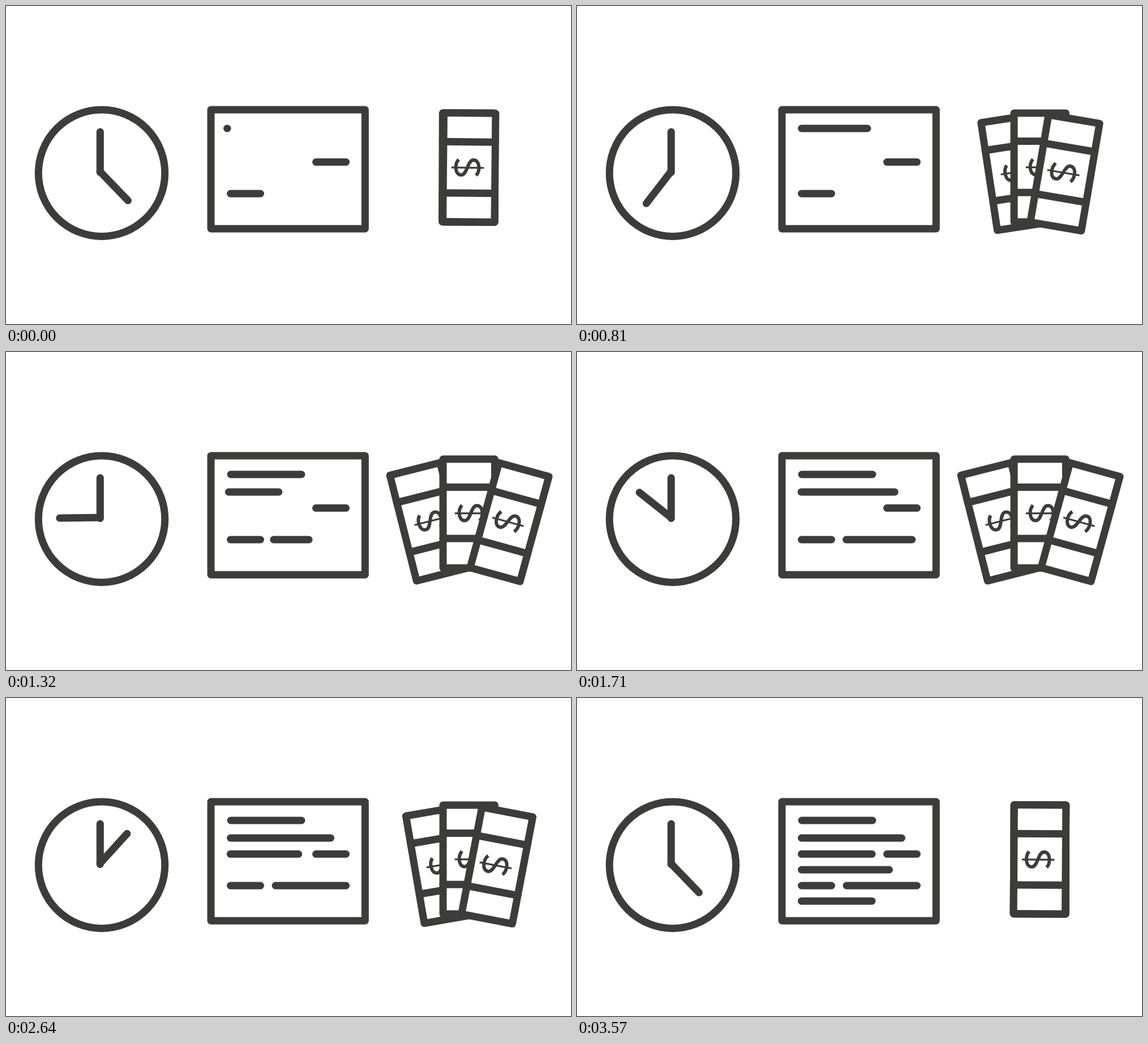
An HTML page that plays this animation: 998 by 561 pixels, repeating every 3600 ms.

```html
<!DOCTYPE html>
<html lang="en">
<head>
<meta charset="utf-8">
<title>Time, code, money</title>
<style>
  html, body { margin: 0; height: 100%; overflow: hidden; background: #fff; }
  svg { display: block; width: 998px; height: 561px; }
</style>
</head>
<body>
<svg viewBox="0 0 998 561" fill="none" stroke="#3c3c3b" stroke-width="13" stroke-linecap="round" stroke-linejoin="round">
  <defs>
    <path id="note" fill="#fff" d="M-45.7-96H45.7V96H-45.7Z"/>
    <g id="dollar" stroke-linecap="butt">
      <path stroke-width="6" d="M-18.8-14C-26-6-25.5 13.2-14 13.2C-3 13.2-3.5-13.2 7.5-13.2C19-13.2 19.5 6 12.3 14"/>
      <path stroke-width="3.2" d="M-31.5 .3H26"/>
    </g>
    <g id="rearBill">
      <use href="#note"/>
      <path d="M-45.7-46.5H45.7M-45.7 44H45.7"/>
      <use href="#dollar" x="6.5" y="-.7"/>
    </g>
    <g id="frontBill">
      <use href="#note"/>
      <path d="M-45.7-45.3H45.7M-45.7 45.2H45.7"/>
      <use href="#dollar"/>
    </g>
  </defs>

  <circle cx="169" cy="294.7" r="111.7"/>
  <path d="M166.3 222V293.5"/>
  <path id="hand" d="M166 292V220.8"/>

  <path d="M362 183H634.3V393H362Z"/>
  <path d="M547.5 275.3H600.5M396.5 331H449.5"/>
  <g class="typed"><path pathLength="1" d="M397 216H522"/></g>
  <g class="typed"><path pathLength="1" d="M396.5 247H573.5"/><path pathLength="1" d="M476 331H600.5"/></g>
  <g class="typed"><path pathLength="1" d="M396.5 275.3H521"/></g>
  <g class="typed"><path pathLength="1" d="M396.5 303H551.5"/><path pathLength="1" d="M396.5 358.2H521"/></g>

  <use id="left" href="#rearBill"/>
  <use href="#rearBill" transform="translate(817.7 285)"/>
  <use id="right" href="#frontBill"/>
</svg>
<script>
const STEP = 30, LOOP = 3600, LAST = LOOP - STEP;
const TYPING = 900, FAN = 1335;
const $ = id => document.getElementById(id);
const clamp = v => Math.min(1, Math.max(0, v));
const mix = (a, b, p) => a + (b - a) * p;
const typed = document.querySelectorAll(".typed");

// Lines of one group grow together from a dot and slide to the margin.
function type(group, i, t) {
  const end = (i + 1) * TYPING - STEP;
  const start = Math.max(0, end - TYPING);
  const p = clamp((t - start) / (end - start));
  group.setAttribute("visibility", t < start ? "hidden" : "visible");
  group.setAttribute("stroke-dasharray", `${Math.max(p, 0.004)} 2`);
  group.setAttribute("transform", `translate(${6.5 * (p - 1)})`);
}

function placeBill(id, x, y, angle, p) {
  $(id).setAttribute("transform",
    `translate(${mix(817.4, x, p)} ${mix(284.8, y, p)}) rotate(${mix(0.4, angle, p)})`);
}

function draw(now) {
  const t = Math.floor(now % LOOP / STEP) * STEP;
  $("hand").setAttribute("transform", `rotate(${136 + 360 * t / LAST} 166 292)`);
  typed.forEach((group, i) => type(group, i, t));
  const fan = clamp(Math.min(t + STEP / 2, LAST - t) / FAN);
  placeBill("left", 746, 299.5, -14.2, fan);
  placeBill("right", 889.4, 300.1, 15.4, fan);
}

const began = performance.now();
function tick() {
  draw(performance.now() - began);
  requestAnimationFrame(tick);
}
tick();
</script>
</body>
</html>
```
